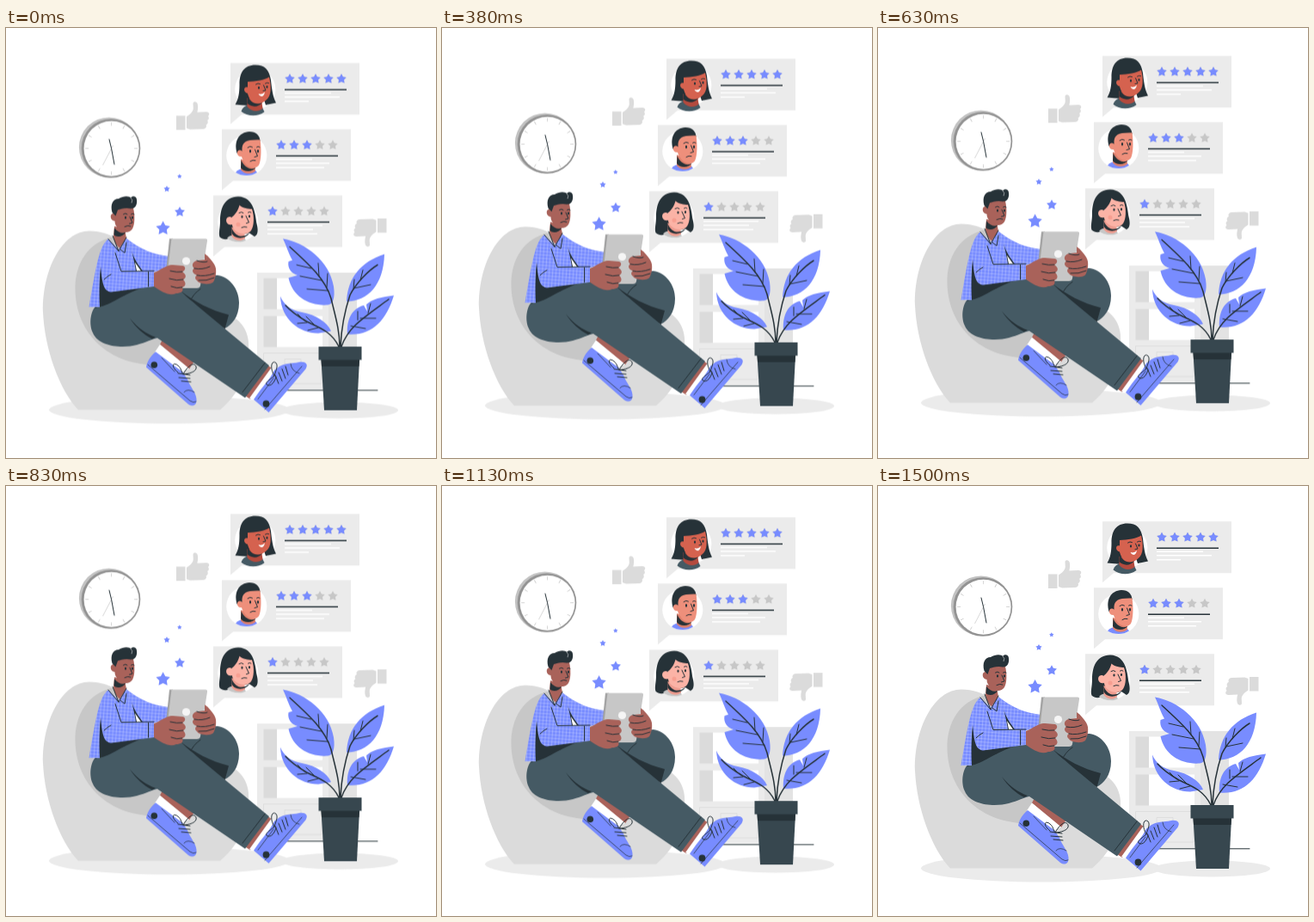
An HTML page that plays this animation: 500 by 500 pixels, repeating every 1540 ms.

```html
<!DOCTYPE html>
<html lang="en">
<head>
<meta charset="utf-8">
<title>Customer reviews</title>
<style>
  html, body { margin: 0; width: 100%; height: 100%; overflow: hidden; background: #fff; }
  svg { display: block; width: 100vw; height: 100vh; }
  #scene { animation: float 1540ms linear -40ms infinite; }
  @keyframes float {
    50% { transform: translateY(-10px); }
  }
  .blue { fill: #788cff; }
  .dark { fill: #263238; }
  .slate { fill: #455a64; }
  .pot { fill: #37474f; }
  .pale { fill: #ebebeb; }
  .grey { fill: #dbdbdb; }
  .mid { fill: #c7c7c7; }
  .white { fill: #fff; }
  .skin { fill: #a9625a; }
  .line { fill: none; stroke: #263238; stroke-width: 1; stroke-linecap: round; stroke-linejoin: round; }
  .thin { stroke-width: .7; }
  .firm { stroke-width: 1.5; }
  .bold { stroke-width: 2.1; }
  .rule { fill: none; stroke: #263238; stroke-width: 1.6; }
  .rows { fill: none; stroke: #fff; stroke-width: 1.4; }
</style>
</head>
<body>
<svg viewBox="0 0 500 500">
  <defs>
    <path id="star" d="M0-9.8 3.1-4.200 9.500-3 5 1.700 5.900 8.100 0 5.300-5.900 8.100-5 1.700-9.500-3-3.100-4.200Z"/>
    <use id="mark" href="#star" transform="translate(69 18.500) scale(.6)"/>
    <g id="three">
      <use href="#mark"/><use href="#mark" x="15"/><use href="#mark" x="30"/>
    </g>
    <g id="five">
      <use href="#three"/><use href="#mark" x="45"/><use href="#mark" x="60"/>
    </g>
    <g id="card">
      <path class="pale" d="M0 0H150V60H13L0 71Z"/>
      <circle class="white" cx="28.800" cy="30.500" r="23.600"/>
      <use href="#five" class="mid"/>
      <path class="rule" d="M63 31.100H135"/>
    </g>
    <g id="thumb" class="grey">
      <path d="M198 102.500H208.500V119H198Z"/>
      <path d="M210 103.500C214 101 217.500 98 217.800 94L217.500 88.500C217.500 85.500 222 85.500 222.800 89C223.600 92.500 223 96 222.300 98.600L233 98C237 98 237 102 234.800 103C236.600 104.400 236 107.200 234 108C235.500 109.500 234.800 112.300 232.600 113C233.800 115.500 232 117.800 229.500 118L214 118.500 210 117Z"/>
    </g>
    <pattern id="check" width="4" height="4" patternUnits="userSpaceOnUse" patternTransform="rotate(4)">
      <path d="M0 .5H4M.5 0V4" fill="none" stroke="#fff" stroke-opacity=".38" stroke-width=".6"/>
    </pattern>
    <path id="torso" d="M119 246C108 253 104 282 96.500 325L109 325C108 305 109 288 110 277C112 300 114 306 122 307.500L172 301 172 284 188 280 190 266C172 264 156 258 140 245L131 258Z"/>
  </defs>

  <g id="scene">
    <!-- room -->
    <ellipse class="pale" cx="190" cy="444.500" rx="140" ry="16"/>
    <ellipse class="pale" cx="388" cy="445" rx="68" ry="9.500"/>
    <path class="pale" d="M292 285H408V421H292Z"/>
    <path fill="#e3e3e3" d="M375 285H408V421H375Z"/>
    <path class="white" d="M315 291.500H368V327.500H315ZM315 335.500H368V371.500H315Z"/>
    <path class="grey" d="M299.500 291.500H315V327.500H299.500ZM299.500 335.500H315V371.500H299.500Z"/>
    <path fill="none" stroke="#dbdbdb" stroke-width=".8" d="M299.500 378.500H367V414H299.500ZM324 385.500H343V391H324Z"/>
    <path class="line" d="M300 421.800H432"/>

    <!-- clock -->
    <circle fill="#c2c2c2" cx="119.800" cy="139.300" r="34.900"/>
    <circle fill="#939393" cx="122" cy="140.500" r="34.300"/>
    <circle class="white" cx="122.600" cy="140.700" r="32"/>
    <circle cx="122.600" cy="140.700" r="28.500" fill="none" stroke="#c7c7c7" stroke-width="4" pathLength="120" stroke-dasharray=".5 9.500" stroke-dashoffset=".25"/>
    <path fill="none" stroke="#c7c7c7" stroke-width=".7" d="M124.500 137 112.500 160"/>
    <path class="line" d="M120 130 122.600 140.700 126 159"/>

    <use href="#thumb"/>
    <use href="#thumb" transform="rotate(180 320.250 170.500)"/>

    <!-- reviews -->
    <g transform="translate(261 41.200)">
      <use href="#card"/><use href="#five" class="blue"/>
      <path class="rows" d="M63 35H117M63 39.500H127M63 44.500H91"/>
    </g>
    <g transform="translate(251 118.200)">
      <use href="#card"/><use href="#three" class="blue"/>
      <path class="rows" d="M63 35H105M63 39.500H125M63 44.500H119"/>
    </g>
    <g transform="translate(241 195.200)">
      <use href="#card"/><use href="#mark" class="blue"/>
      <path class="rows" d="M63 35H127M63 39.500H116M63 44.500H121"/>
    </g>

    <!-- long bob -->
    <path class="dark" d="M290 43.500C277 43.500 271.500 52 271.500 66C271.500 77 270 84 266.500 89.500L283 91 300 84 302 90 314 87.500C310 80 309 70 308 61C306 49 301 43.500 290 43.500Z"/>
    <path class="slate" d="M273.500 97.500C275 93 278 91 281 90.500L298 93 300.500 98C292 104.500 280 103 273.500 97.500Z"/>
    <path fill="#b34a3e" d="M280.500 82V92C286 98.500 294 98 298.500 94L297 84Z"/>
    <path fill="#d5624f" d="M281 63C290 62.500 301 61 306 57.500C308 65 309 76 305 81.500C301 87 294 90.500 288 87.500C284.500 85.500 281.500 80 281 76.500C276 76 275.500 68 281 69.500Z"/>
    <path class="dark" d="M281 78C283 87 291 91 298 87C293 94 284 92 280.500 88Z"/>
    <path class="white" d="M293.500 77Q298 78.500 301 75Q300 80 297 80Q294.500 79.500 293.500 77Z"/>
    <path class="line" d="M290.500 66Q293 64 295.500 65.500M301.500 65Q303.500 63.500 305.500 64.500M299.500 67 302 73 299 73.500"/>
    <path class="line bold" d="M294 69.500V70.500M303.500 68.500V69.500"/>

    <!-- short hair -->
    <path class="blue" d="M267 168.500C270 165 273 164 276 164L290 166 292 168.500C285 173.500 274 173 267 168.500Z"/>
    <path fill="#dd7f6c" d="M273 153V165.500C277 171 286 170.500 290 167L289 158Z"/>
    <path class="dark" d="M273.500 154C277 163 286 167 291 162C287 169 276 168 273 163Z"/>
    <path class="dark" d="M268.500 146C264.500 132 271 121.500 283 121C291 121 295 125.500 295.500 132L275 150Z"/>
    <path fill="#ee8f7b" d="M274.500 140C275.500 133 279 130 295.500 130.500C297 141 297 154 294 160C290 165.500 281 162.500 277.500 157C275.500 154.500 274.500 152 274 150C268.500 151 267 143 271.500 142.500C273 142.500 274 143 274.500 144Z"/>
    <path class="line" d="M281 139.500Q284 137 286.500 139M291.500 139Q293 137.500 295 139M289.500 142 292.500 149.500 289 150.500M284 155.500Q287 153.500 290 154.500"/>
    <path class="line bold" d="M284 143V144.500M293 143V144.500"/>

    <!-- wavy bob -->
    <path class="dark" d="M270 196.500C254 197 249 210 249 225C249 233 247 239 248.500 243.500C253 247.500 258 247 263 243L283 239 289 243C293 241 293.500 236 291.500 228C290 219 289 197 270 196.500Z"/>
    <path class="mid" d="M257 245C259 242 262 241.500 264 241.500L277 244 279 247.500C273 250.500 263 250 257 245Z"/>
    <path fill="#ee9c8f" d="M262.500 232V243C267 249 274 248.500 278 245L277 237Z"/>
    <path class="dark" d="M262.500 233C266 242 274 246 283 239C279 246 266 247 262.500 239Z"/>
    <path fill="#fbb3a6" d="M262 221C266 218 270 213 271.500 206.500C275 210 282 211 286 211C289 220 288.500 231 285 236C280.500 242 271 240.500 266 235.500C264 233 263 231 263 229C256.500 231 254 223 258 220.500C260 219.500 261.500 220 262 221Z"/>
    <circle fill="#f79f91" cx="270" cy="229" r="2.500"/>
    <path class="line" d="M271 215.500Q274 213.500 276 215.500M281.500 215Q283.500 213.500 285 215M279 219 282.500 226.500 279.500 227.500M274 232.500Q277 231 280 232"/>
    <path class="line bold" d="M274.500 219.500V220.500M283 219V220"/>

    <!-- rising stars -->
    <g class="blue">
      <use href="#star" transform="translate(182.600 233.500) scale(.86)"/>
      <use href="#star" transform="translate(202 214.500) scale(.63)"/>
      <use href="#star" transform="translate(187 187.700) scale(.38)"/>
      <use href="#star" transform="translate(201.800 173) scale(.28)"/>
    </g>

    <!-- beanbag -->
    <path class="grey" d="M97 236.500C65 236.500 42 282 43 331C45 374 62 421 84 444.500H249C270 427 284 401 282 366C281 345 262 329 240 329L135 250C122 240 110 236.500 97 236.500Z"/>
    <path class="mid" d="M126 243C95 249 80 275 80.500 305C81 348 111 392 176 392.500L230 360 150 262Z"/>

    <!-- far leg -->
    <path class="skin" d="M186 355 179 368.500 213 397 223 382Z"/>
    <path class="white" d="M179 368.500 173 377.500 203 401 213 396.500Z"/>
    <path class="blue" d="M174 377C167 383 164 389 163 395L212 438C217 441 222 440 221.500 432C221 424 214 418 211 409L205 400 198 395Z"/>
    <path class="line thin" d="M165 392 214 434Q218 437 221 435M181 384 196 400M207 424Q211 419 219 424"/>
    <circle class="dark" cx="172.300" cy="392.300" r="3.800"/>
    <path class="line" d="M200 401C191 394 194 388 200 393C204 396 204 401 206 403C211 394 218 388 221 394C223 400 212 403 206 403M200 402 214 404M201 407 214 408M204 411 215 412"/>
    <path class="slate" d="M180 302C205 296 229 288 246 288C260 290 271 304 271 320C271 337 262 346 255 349.500L205 330 150 320Z"/>
    <path class="dark" d="M203 306C218 318 238 329 259 334L254.500 350.500 223 326Z"/>
    <path class="line" d="M213 320Q218 309 226 304"/>

    <!-- near leg -->
    <path class="skin" d="M303 392 309 396 284 432 276 427Z"/>
    <path class="white" d="M308.500 395.500 313 399 291 433 283 431Z"/>
    <path class="blue" d="M311.500 399C308 408 299 416 288 432.500L305.500 447.500 348.500 397C352 391 348 388 341 389C331 391 325 390 318 394Z"/>
    <path class="line thin" d="M301 444 344 394M293 432 311 408M331 391Q332 400 341 402"/>
    <circle class="dark" cx="302.500" cy="437.500" r="3.900"/>
    <path class="line" d="M312 405C306 395 309 386 314 390C317 394 313 400 312 405C306 410 301 413 303 415C308 419 313 411 314 406M313 404 317 414M317 401 321 411M321 397 325 408M325 394 328 404"/>
    <path class="slate" d="M107 322C98 327 96 345 101 355C108 372 137 373 152 369C163 366 170 362 176 361L278 430.500 306 393 223 324C207 309 187 298 166 299C143 301 126 312 107 322Z"/>
    <path class="dark" d="M144 338C154 350 163 356 174 360L170 362C160 357 151 349 144 338Z"/>
    <path class="line" d="M275 424 301 390"/>
    <path class="line thin" d="M104 326Q118 316 138 311"/>

    <!-- body -->
    <path class="dark" d="M110 277C107 296 107 312 108 325C121 323 136 310 160 302L118 300Z"/>
    <path class="skin" d="M126 231 125 243C126 251 131 256 133 257L140 245 138 234Z"/>
    <use href="#torso" class="blue"/>
    <use href="#torso" fill="url(#check)"/>
    <path class="dark" d="M146 259C149 270 154 276 159 283L151 283C150 276 148 267 146 259Z"/>
    <path class="white" d="M150 273 157 283H152Z"/>
    <path class="line" d="M127 262 134 283.500 172 283M165.500 284V301M119 246 131 260 140 244M124 242 131 260M133 258 138 262 140 250M114 293Q118 289 122 287"/>

    <!-- head -->
    <path class="dark" d="M126 233C130 238 135 240 139 238C136 244 128 244 125.500 241Z"/>
    <path class="skin" d="M127 211C134 208 143 207 148 210C150 218 150 229 147 234C143 240 134 239 129 232C127 230 126.500 227 126.500 225C121 225 120 216 125 216Z"/>
    <path class="dark" d="M123.500 215C121 206 124 199 131 199C137 195 144 196 145 198C147 195 152 196 152 200C153 206 150 211 145 210.500C139 209 133 211 130 212L127.500 219Z"/>
    <path fill="none" stroke="#fff" stroke-width=".5" d="M145 198Q148 200 146 204"/>
    <path class="line" d="M136.500 217Q139 215 141 217M145.500 217Q147 215.500 149 217M144 220 147 227 143.500 228M138 231.500Q142 229.500 145 231"/>
    <path class="line bold" d="M139 220.500V221.500M147 220.500V221.500"/>

    <!-- tablet and hands -->
    <path fill="#a3a3a3" d="M190 245.500H194L200 303H184Z"/>
    <path class="mid" d="M192.500 245.500H232Q234.500 245.500 234 248L226 300Q225.500 303 222 303H188Q185.500 303 186 300Z"/>
    <circle fill="#f5f5f5" cx="209.500" cy="271.500" r="4.600"/>
    <path class="skin" d="M172 285C181 281 188 275 194 276L206 277C210 279 208 283 205 284C210 287 210 291 206 293C210 297 209 301 205 302C207 307 203 309 198 309C190 313 181 307 172 301Z"/>
    <path class="line" d="M191 283Q199 285 205 284M190 292Q199 295 206 293M192 301Q199 304 205 302"/>
    <path class="skin" d="M231 263C236 266 239 271 242 275C246 281 244 291 241 296C236 300 224 298 222 294C219 292 220 289 222 288C216 286 216 281 219 280C215 277 217 272 222 271L231 270Z"/>
    <path class="line" d="M219 280Q228 282 237 278M222 288Q231 290 242 286M224 294Q233 295 242 291M222 271Q230 274 234 272"/>

    <!-- plant -->
    <g class="blue">
      <path d="M322 245.500C348 250 376 271 381 301C383 315 380 322 374 322.500C353 324 333 313 328.500 291L339 288C332 286 327 280 328.500 272L333 270.500C328 262 326 253 322 245.500Z"/>
      <path d="M440 263.500C413 272 397 291 396 318.500C421 318 439 299 440 263.500Z"/>
      <path d="M319 312.500C320 339 341 355.500 363 355.500L378 353C374 343 361 334 344 331C331 329 323 322 319 312.500Z"/>
      <path d="M451 311.500C437 313 425 316 419 322L420 330 416 323C401 327 396 341 397 356.500C425 359 442 341 451 311.500Z"/>
    </g>
    <path class="line firm" d="M388 371C388 352 383 336 378 315C371 292 352 275 330 255M389 371C390 347 395 326 400 311C407 297 422 282 432 276M387 371C379 354 365 349 350 342Q333 332 325 323M390 371C398 348 415 338 445 316"/>
    <path class="line" d="M364 289 363 274M373 302 374 286M355 280 338 276M367 294 342 289M375 306 350 304M404 304 405 293M412 294 415 282M405 303 424 299M347 341 339 333M360 347 349 336M350 343 339 344M363 349 351 352M409 340 409 330M421 332 424 321M412 338 430 338M401 347 418 350"/>
    <path class="pot" d="M366.500 386H411L408 445H370Z"/>
    <path class="dark" d="M366.500 386H411L410.500 394H367Z"/>
    <path class="pot" d="M363.500 371H413.500V386.500H363.500Z"/>
  </g>
</svg>
</body>
</html>
```
